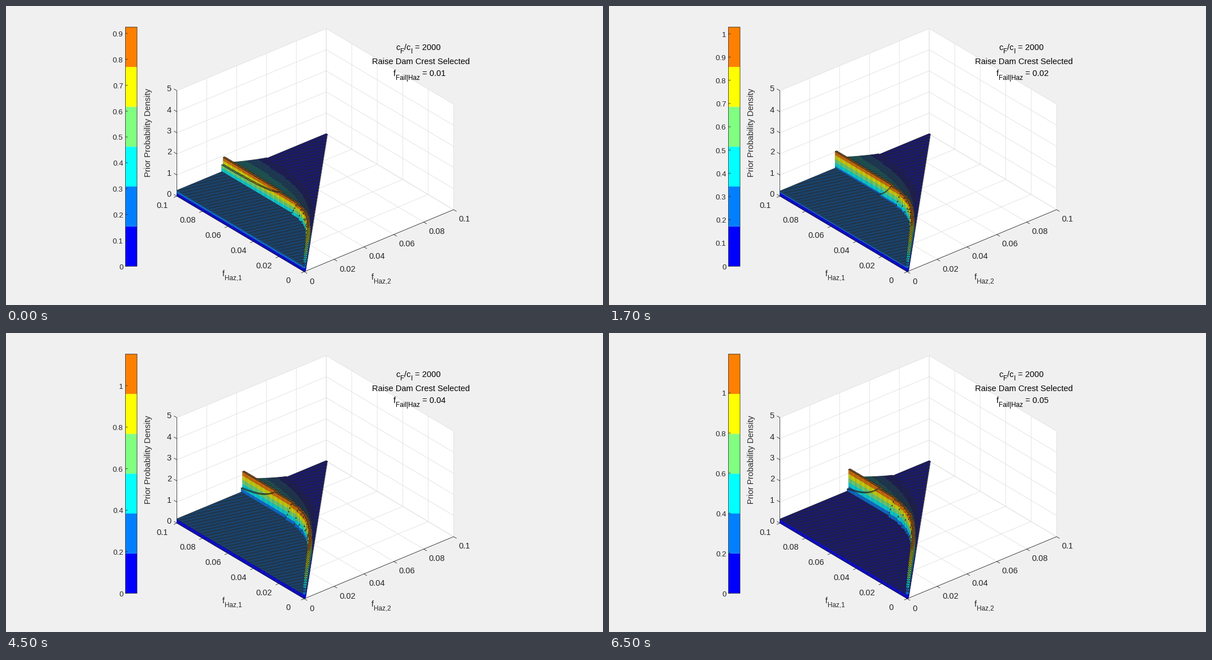
These frames come from a looping animation (1057x530 px, 8 s). A matplotlib script:

```python
import numpy as np
import matplotlib.pyplot as plt
from matplotlib.animation import FuncAnimation
from matplotlib.collections import LineCollection, PolyCollection
from matplotlib.patches import Polygon, Rectangle

W, H, DPI = 1057, 530, 100
PX = 72 / DPI
N = 100
INK = "#262626"
EDGE = (.15, .15, .15)
GRID = "#dfdfdf"
BANDS = [(0, 0, 1), (0, .5, 1), (0, 1, 1), (.5, 1, .5), (1, 1, 0), (1, .5, 0)]
BEND = 5.5  # how sharply the ridge turns into the diagonal

# ridge position, peak height, plateau height, colorbar tick step
STATES = [(.3125, .925, .27, .1),
          (.378, 1.029, .237, .1),
          (.4185, 1.098, .217, .1),
          (.444, 1.152, .201, .2),
          (.4645, 1.194, .19, .2)]

plt.rcParams["font.family"] = "Liberation Sans"
fig = plt.figure(figsize=(W / DPI, H / DPI), dpi=DPI, facecolor="#f0f0f0")
ax = fig.add_axes([0, 0, 1, 1])
ax.set_xlim(0, W)
ax.set_ylim(H, 0)
ax.axis("off")


def proj(a, b, z=0):
    """Screen point for f1 = a/10, f2 = b/10 and density z."""
    return 528 - 225.5 * a + 264.5 * b, 471 - 134 * a - 110 * b - 37.4 * z


def lines(segs, color, zorder, width=.8):
    return ax.add_collection(LineCollection(
        segs, colors=color, linewidths=width * PX, zorder=zorder, snap=False))


def label(x, y, s, ha="center", size=14.67, color=INK, **kw):
    """Text whose digits are centred on y."""
    return ax.text(x, y + .36 * size, s, ha=ha, va="baseline",
                   fontsize=size * PX, color=color, **kw)


def rich(cx, base, parts, color="k", size=14.67):
    """Centred line of (text, is_subscript) parts."""
    placed, x = [], 0
    for s, sub in parts:
        fs = size * (.8 if sub else 1)
        x += .278 * fs * (len(s) - len(s.lstrip()))
        t = ax.text(0, base + (6.5 if sub else 0), s.strip(), va="baseline",
                    ha="left", fontsize=fs * PX, color=color, zorder=6)
        placed.append((t, x))
        x += t.get_window_extent().width
    for t, dx in placed:
        t.set_x(cx - x / 2 + dx)
    return [t for t, _ in placed]


def draw_axes():
    hull = [proj(1, 0), proj(1, 0, 5), proj(1, 1, 5),
            proj(0, 1, 5), proj(0, 1), proj(0, 0)]
    ax.add_patch(Polygon(hull, fc="w", ec="none", zorder=0))
    grid = []
    for v in np.linspace(0, 1, 6):
        z = 5 * v
        grid += [(proj(v, 0), proj(v, 1)), (proj(0, v), proj(1, v)),
                 (proj(1, v), proj(1, v, 5)), (proj(v, 1), proj(v, 1, 5)),
                 (proj(1, 0, z), proj(1, 1, z)), (proj(0, 1, z), proj(1, 1, z))]
    lines(grid, GRID, 1)

    o, left, right = proj(0, 0), proj(1, 0), proj(0, 1)
    rules = [(left, proj(1, 0, 5)), (left, o), (o, right)]
    for k in range(6):
        v = k / 5
        for (x, y), dx, dy in ((proj(v, 0), -5.5, 2.3), (proj(0, v), 5.2, 3.1),
                               (proj(1, 0, k), -5.2, -3.1)):
            rules.append(((x, y), (x + dx, y + dy)))
        label(293, 333 - 37.4 * k, str(k), "right")
        label(537 + 52.9 * k, 487.5 - 22.2 * k, f"{v / 10:g}", "left")
        label(277 + 45 * k - 2.5 * (k == 5), 352.5 + 26.7 * k, f"{.1 - v / 10:.2g}")
    lines(rules, INK, 2)

    ax.text(252, 224.5, "Prior Probability Density", rotation=90, ha="center",
            va="center", fontsize=14.67 * PX, color=INK)
    rich(400, 479, [("f", 0), ("Haz,1", 1)], INK)
    rich(664.5, 485, [("f", 0), ("Haz,2", 1)], INK)
    rich(730, 78, [("c", 0), ("F", 1), ("/c", 0), ("I", 1), (" = 2000", 0)])
    label(734.5, 97.7, "Raise Dam Crest Selected", color="k", zorder=6)


def draw_colorbar():
    x, top, width, height = 211.5, 37.3, 20.5, 424
    h = height / 6
    for k, c in enumerate(BANDS):
        ax.add_patch(Rectangle((x, top + (5 - k) * h), width, h,
                               fc=c, ec="none", zorder=1, snap=False))
    ax.add_patch(Rectangle((x, top), width, height, fc="none", ec=INK,
                           lw=.8 * PX, zorder=3, snap=False))


def heights(ridge, peak, plateau):
    """Bar heights over the triangle f2 <= f1; zero elsewhere."""
    i, j = np.mgrid[0:N, 0:N]
    a, b = (i + .5) / N, (j + .5) / N

    def bend(end):
        return (a ** -BEND + end ** -BEND - 1) ** (-1 / BEND)

    inner, outer = bend(ridge), bend(ridge + .283)
    col = np.floor(inner * N)
    step = np.clip(1 - 2 * (inner * N - col), 0, 1)
    crest = peak * (1 - .75 * np.exp(-a / .13))
    t = np.clip((b - inner) / np.maximum(outer - inner, .004), 0, 1)
    slope = .62 * (1 - t) ** 1.1 + .04 + .27 * np.exp(-t / .07)
    z = np.where(j > col, crest * slope * (t < 1) + .02, plateau)
    z = np.where(j == col, crest, z)
    z = np.where(j == col - 1, plateau + (crest - plateau).clip(0) * step, z)
    return np.where(j <= i, z, 0)


def bars(ridge, peak, plateau):
    z = heights(ridge, peak, plateau)
    quads, faces, edges, widths = [], [], [], []

    def add(quad, face, edge, width):
        quads.append(quad)
        faces.append(face)
        edges.append(edge)
        widths.append(width * PX)

    def side(p, q, low, high):
        if high - low < .004:
            return

        def quad(lo, hi):
            return [proj(*p, lo), proj(*q, lo), proj(*q, hi), proj(*p, hi)]

        for k, c in enumerate(BANDS):
            lo, hi = max(low, k * peak / 6), min(high, (k + 1) * peak / 6)
            if hi > lo:
                add(quad(lo, hi), (*c, 1), (*c, 1), .2)
        add(quad(low, high), (0, 0, 0, 0), (*EDGE, 1), .55)

    cells = [(i, j) for i in range(N) for j in range(i + 1)]
    for i, j in sorted(cells, key=lambda c: -c[0] - c[1]):
        top = z[i, j]
        a, b, a2, b2 = i / N, j / N, (i + 1) / N, (j + 1) / N
        side((a, b), (a2, b), z[i, j - 1] if j else 0, top)
        side((a, b), (a, b2), z[i - 1, j] if i else 0, top)
        c = BANDS[min(5, int(6 * top / peak))]
        add([proj(a, b, top), proj(a2, b, top), proj(a2, b2, top),
             proj(a, b2, top)], (*c, 1), (*EDGE, 1), .93)
    return ax.add_collection(PolyCollection(
        quads, facecolors=faces, edgecolors=edges, linewidths=widths,
        zorder=4, snap=False))


def build(n, ridge, peak, plateau, step):
    arts = [bars(ridge, peak, plateau)]
    ticks = []
    for v in np.arange(0, peak, step):
        y = 461.3 - 424 * v / peak
        ticks.append(((211.5, y), (215.5, y)))
        arts.append(label(207.5, y + .5, f"{v:.2g}", "right", 13.33))
    arts.append(lines(ticks, INK, 3))
    arts += rich(732, 124.5, [("f", 0), ("Fail|Haz", 1), (f" = 0.0{n + 1}", 0)])
    return arts


draw_axes()
draw_colorbar()
scenes = [build(n, *s) for n, s in enumerate(STATES)]


def update(frame):
    now = (frame + 3) // 4
    for n, arts in enumerate(scenes):
        for art in arts:
            art.set_visible(n == now)
    return []


update(0)
anim = FuncAnimation(fig, update, frames=16, interval=500, repeat=True,
                     repeat_delay=0, blit=False)
plt.show()
```
